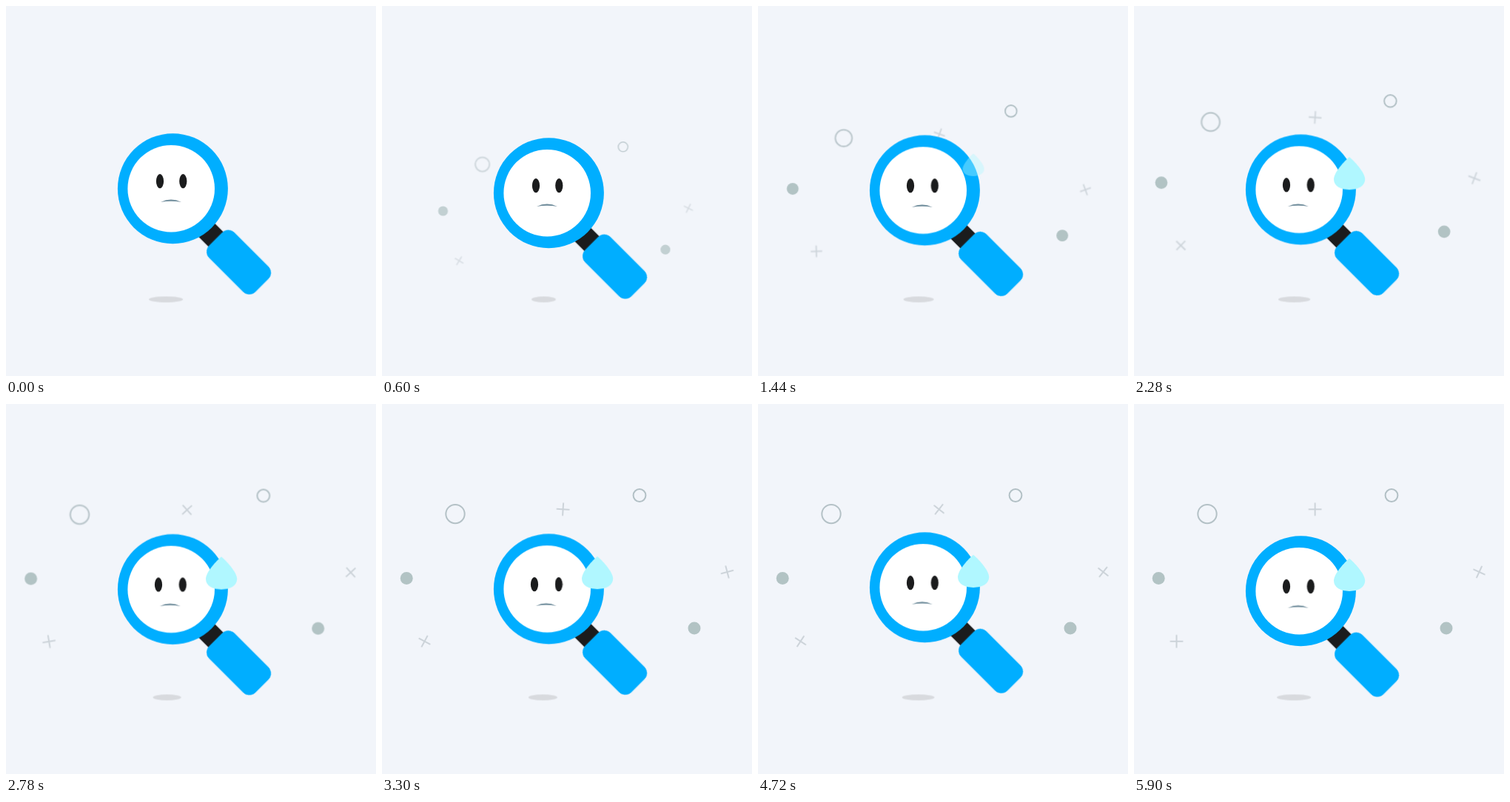
Write an HTML page that moves like this. It is 500 by 500 pixels and loops after 5920 ms.

```html
<!DOCTYPE html>
<html lang="en">
<head>
<meta charset="utf-8">
<title>Worried magnifier</title>
<style>
  html, body { margin: 0; width: 100%; height: 100%; overflow: hidden; background: #f2f5fa; }
  svg { display: block; width: 100vw; height: 100vh; }

  svg [class] { animation: 5920ms linear infinite; }

  /* Scenery bursts out from below the glass, overshoots and settles. */
  svg .near, svg .far { transform-origin: 250px 418px; }
  svg .near { animation-name: near, fade; }
  svg .far { animation-name: far, fade; }
  @keyframes near {
    0% { transform: scale(0); animation-timing-function: cubic-bezier(.37, 0, .63, 1); }
    16.13% { transform: scale(1.105); animation-timing-function: cubic-bezier(.37, 0, .63, 1); }
    24.3% { transform: scale(.937); animation-timing-function: cubic-bezier(.35, .45, .6, 1); }
    51%, 100% { transform: scale(1); }
  }
  @keyframes far {
    0% { transform: scale(0); animation-timing-function: cubic-bezier(.37, 0, .63, 1); }
    16.4% { transform: scale(1.107); animation-timing-function: cubic-bezier(.37, 0, .63, 1); }
    24.2% { transform: scale(.888); animation-timing-function: cubic-bezier(.35, .45, .6, 1); }
    51%, 100% { transform: scale(1); }
  }
  @keyframes fade {
    0% { opacity: 0; }
    13.5%, 100% { opacity: 1; }
  }

  svg .spin-left { animation-name: spin-left; }
  svg .spin-right { animation-name: spin-right; }
  svg .spin-top { animation-name: spin-top; }
  @keyframes spin-left {
    0% { transform: rotate(0deg); }
    10.1% { transform: rotate(31deg); }
    24.3% { transform: rotate(88deg); }
    38.5% { transform: rotate(134deg); }
    55.7% { transform: rotate(208deg); }
    79.7% { transform: rotate(303deg); }
    99.6%, 100% { transform: rotate(360deg); }
  }
  @keyframes spin-right {
    0% { transform: rotate(0deg); }
    10.1% { transform: rotate(26deg); }
    24.3% { transform: rotate(70deg); }
    38.5% { transform: rotate(111deg); }
    55.7% { transform: rotate(165deg); }
    79.7% { transform: rotate(218deg); }
    100% { transform: rotate(296deg); }
  }
  @keyframes spin-top {
    0%, 20.5% { transform: rotate(0deg); }
    89.7%, 100% { transform: rotate(360deg); }
  }

  svg .glass { animation-name: bob; }
  @keyframes bob {
    0%, 20.4%, 40.8%, 61.2%, 81.6% { transform: translateY(0); }
    10.2%, 30.6%, 51%, 71.4%, 91.8%, 100% { transform: translateY(6px); }
  }

  svg .shadow { animation-name: shrink; }
  @keyframes shrink {
    0%, 20.4%, 40.8%, 61.2%, 81.6%, 99.6%, 100% { transform: translate(216.1px, 396.5px) scaleX(1); }
    10.2%, 30.6%, 51%, 71.4%, 91.8% { transform: translate(218.5px, 396.5px) scaleX(.71); }
  }

  /* The face glances down as the sweat drop forms. */
  svg .eye-left { animation-name: eye-left; }
  svg .eye-right { animation-name: eye-right; }
  svg .mouth { animation-name: mouth; }
  @keyframes eye-left {
    0%, 13.5% { transform: translate(0, 0); }
    20.3%, 100% { transform: translate(-2px, 3.8px); }
  }
  @keyframes eye-right {
    0%, 13.5% { transform: translate(0, 0); }
    20.3%, 100% { transform: translate(-.5px, 3.8px); }
  }
  @keyframes mouth {
    0%, 13.5% { transform: translate(0, 0); }
    20.3%, 100% { transform: translate(-1.2px, 4.6px); }
  }

  svg .drop { transform-origin: 291px 225px; animation-name: drop; }
  @keyframes drop {
    0%, 20.3% { opacity: 0; transform: translateY(-21px) scale(.48); }
    30.4%, 100% { opacity: 1; transform: translateY(0) scale(1); }
  }
</style>
</head>
<body>
<svg viewBox="0 0 500 500">
  <defs>
    <path id="cross" d="M-8.8 0H8.8M0-8.8V8.8" fill="none" stroke="#ccd3d9" stroke-width="2"/>
  </defs>

  <g class="near" fill="#b2c3c4">
    <circle cx="33.2" cy="235.6" r="8.5"/>
    <circle cx="422" cy="303" r="8.5"/>
    <circle cx="348" cy="123.5" r="8.4" fill="none" stroke="#b2c0c5" stroke-width="2"/>
  </g>
  <g class="far">
    <circle cx="99" cy="148.6" r="12.7" fill="none" stroke="#b4c1c6" stroke-width="2"/>
    <g transform="translate(57.5 320.7)"><use href="#cross" class="spin-left"/></g>
    <g transform="translate(466.5 227)"><use href="#cross" class="spin-right"/></g>
    <g transform="translate(244.6 142.3)"><use href="#cross" class="spin-top"/></g>
  </g>

  <ellipse class="shadow" rx="23.2" ry="4" fill="#d8dade"/>

  <g class="glass">
    <g transform="translate(314.6 346.2) rotate(45)">
      <rect x="-80" y="-14.2" width="40" height="28.4" fill="#1b1c1d"/>
      <rect x="-44.3" y="-24.3" width="88.6" height="48.6" rx="12" fill="#00aeff"/>
    </g>
    <circle cx="225.4" cy="246.7" r="74.5" fill="#00aeff"/>
    <circle cx="223.2" cy="246.7" r="58.8" fill="#fff"/>
    <ellipse class="eye-left" cx="208" cy="236.7" rx="5.1" ry="9.6" fill="#1b1c1d"/>
    <ellipse class="eye-right" cx="239.3" cy="236.7" rx="5.1" ry="9.6" fill="#1b1c1d"/>
    <path class="mouth" d="M209 264.9Q223 258.1 237 264.9Q223 262.4 209 264.9Z" fill="#6f8c9b"/>
    <path class="drop" d="M291 202.8C297 207.5 312.2 223.5 312.2 232.8C312.2 242 303 246.9 291 246.9C279 246.9 270 242 270 232.8C270 223.5 285 207.5 291 202.8Z" fill="#b0f7ff"/>
  </g>
</svg>
</body>
</html>
```
